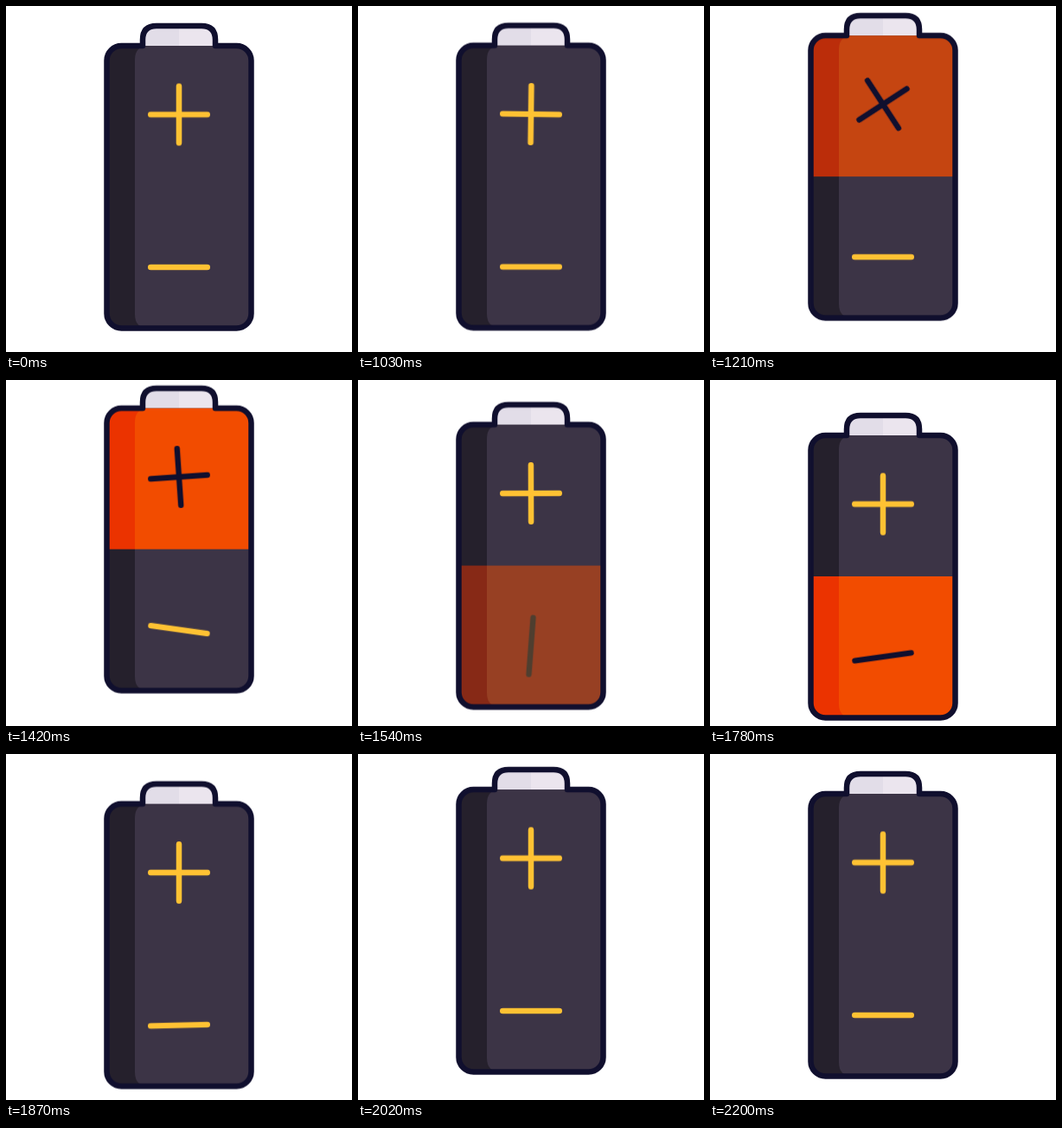
Animation of 400 by 400 pixels, one loop 2230 ms. Source, as an HTML page:

```html
<!DOCTYPE html>
<html lang="en">
<head>
<meta charset="utf-8">
<title>Battery</title>
<style>
  html, body { margin: 0; width: 100%; height: 100%; overflow: hidden; background: #fff; }
  svg { display: block; width: 100vw; height: 100vh; }
  .sign { fill: none; stroke: #ffc233; stroke-width: 6.6; stroke-linecap: round; }
  .glow { opacity: 0; }
</style>
</head>
<body>
<svg viewBox="0 0 400 400">
  <defs>
    <clipPath id="shell"><rect x="116.5" y="46" width="167" height="326.5" rx="17"/></clipPath>
    <path id="panel" d="M284 46H165Q149 46 149 62V356.500Q149 372.500 165 372.500H284Z"/>
    <clipPath id="front"><use href="#panel"/></clipPath>
  </defs>
  <g id="battery">
    <path fill="#e2dde8" d="M158 47V39Q158 23 174 23H200V47Z"/>
    <path fill="#ebe5ee" d="M242 47V39Q242 23 226 23H200V47Z"/>
    <g clip-path="url(#shell)">
      <rect x="113" y="46" width="174" height="330" fill="#25202c"/>
      <use href="#panel" fill="#3c3446"/>
      <g id="topGlow" class="glow">
        <rect x="113" y="46" width="174" height="163" fill="#eb3300"/>
        <rect x="113" y="46" width="174" height="163" fill="#f24c00" clip-path="url(#front)"/>
      </g>
      <g id="lowGlow" class="glow">
        <rect x="113" y="209" width="174" height="166" fill="#eb3300"/>
        <rect x="113" y="209" width="174" height="166" fill="#f24c00" clip-path="url(#front)"/>
      </g>
    </g>
    <path fill="none" stroke="#100f2e" stroke-width="6.5" stroke-linejoin="round"
      d="M158 46V39Q158 23 174 23H226Q242 23 242 39V46H266.500A17 17 0 0 1 283.500 63V355.500A17 17 0 0 1 266.500 372.500H133.500A17 17 0 0 1 116.500 355.500V63A17 17 0 0 1 133.500 46Z"/>
    <g transform="translate(200 125.500)"><path id="plus" class="sign" d="M-32.700 0H32.700M0 -32.700V32.700"/></g>
    <g transform="translate(200 302)"><path id="minus" class="sign" d="M-32.700 0H32.700"/></g>
  </g>
</svg>
<script>
const LOOP = 2230;
const SOFT = 'cubic-bezier(.333,0,.667,1)';
const SPIN = 'cubic-bezier(.3,0,.15,1)';
const YELLOW = '#ffc233', NAVY = '#100f2e';

// steps: [time in ms, value]; the first and last values hold to the loop's ends
function play(id, prop, steps, easing = 'linear') {
  const all = [[0, steps[0][1]], ...steps, [LOOP, steps[steps.length - 1][1]]];
  const frames = all.map(([t, v]) => ({ offset: t / LOOP, [prop]: v, easing }));
  document.getElementById(id).animate(frames, { duration: LOOP, iterations: Infinity });
}

const lift = [[1000, 0], [1300, -15], [1386, -15], [1652, 18], [1797, 18], [2010, -5], [2208, 0]];
play('battery', 'transform', lift.map(([t, y]) => [t, `translateY(${y}px)`]), SOFT);

function charge(sign, glow, start, turn) {
  const at = (...steps) => steps.map(([t, v]) => [start + t, v]);
  play(sign, 'transform', at([0, 'rotate(0deg)'], [575, `rotate(${turn}deg)`]), SPIN);
  play(sign, 'stroke', at([105, YELLOW], [200, NAVY], [418, NAVY], [498, YELLOW]));
  play(glow, 'opacity', at([115, 0], [235, 1], [418, 1], [498, 0]));
}
charge('plus', 'topGlow', 1005, 90);
charge('minus', 'lowGlow', 1366, 180);
</script>
</body>
</html>
```
